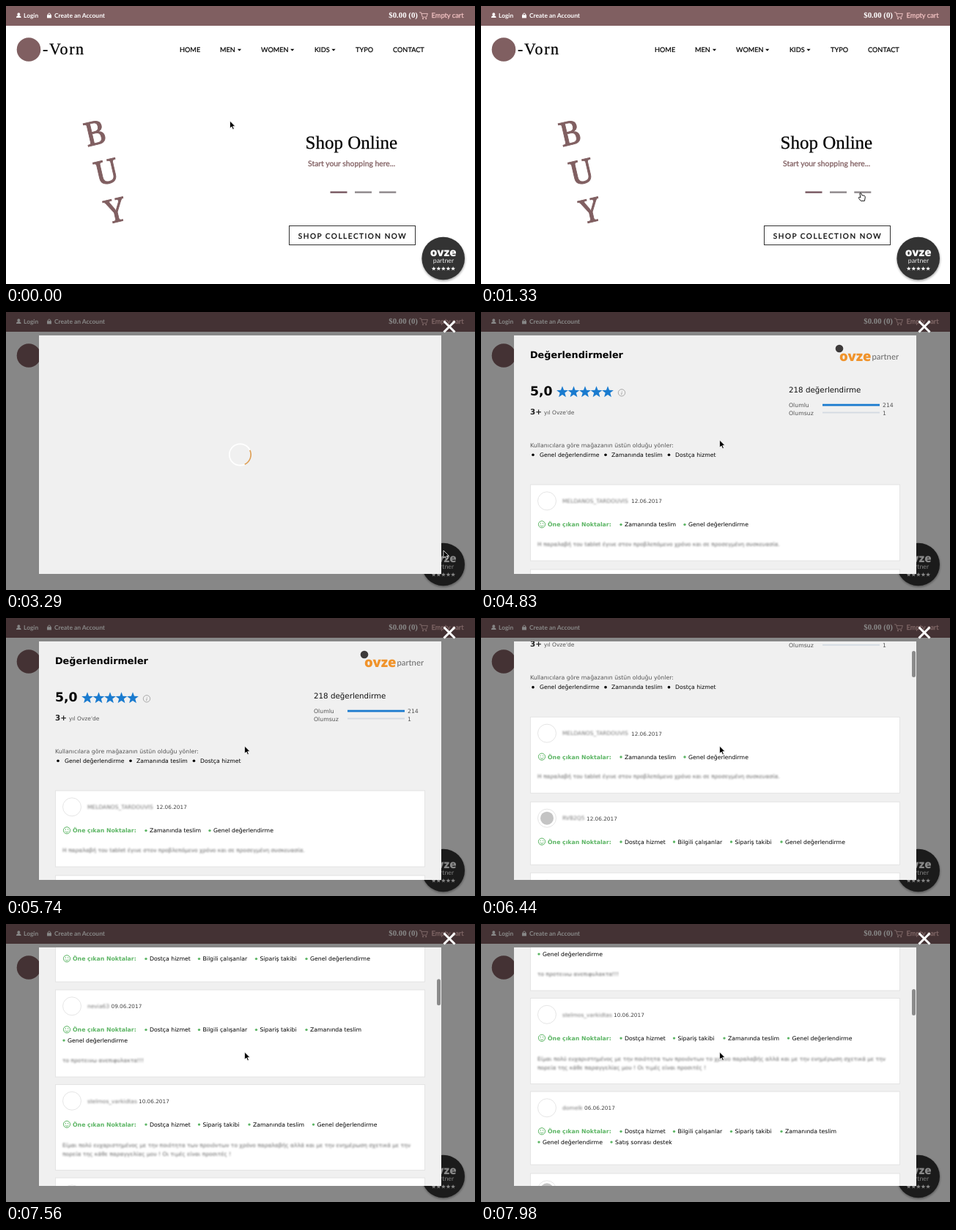
Recreate the animation shown at these times as an HTML page. Size 640x380 px, loop 8000 ms.

```html
<!DOCTYPE html>
<html lang="tr">
<head>
<meta charset="utf-8">
<title>Shop reviews</title>
<style>
  html, body { margin: 0; width: 100%; height: 100%; overflow: hidden; background: #fff; }
  svg { display: block; width: 100vw; height: 100vh; }
  text { text-rendering: geometricPrecision; white-space: pre; }
  .lato { font-family: Lato, sans-serif; }
  .serif { font-family: "Liberation Serif", serif; }
  .slab { font-family: "Noto Serif", serif; }
  .logo { font-family: "Open Sans", sans-serif; font-weight: 800; }
  .ui { font-family: "DejaVu Sans", sans-serif; }
  .b { font-weight: 700; }
  .blur { filter: blur(1.1px); }
</style>
</head>
<body>
<svg id="stage" viewBox="0 0 640 380" xmlns="http://www.w3.org/2000/svg"></svg>
<script>
const LOOP = 8000, STEP = 70;
const BROWN = '#805f61', GREEN = '#5cb564', BLUE = '#1a7bcf';

const text = (x, y, size, str, cls, fill = '#000', extra = '') =>
  `<text x="${x}" y="${y}" font-size="${size}" class="${cls}" fill="${fill}" ${extra}>${str}</text>`;
const rect = (x, y, w, h, fill, extra = '') =>
  `<rect x="${x}" y="${y}" width="${w}" height="${h}" fill="${fill}" ${extra}/>`;
const circle = (x, y, r, fill, extra = '') =>
  `<circle cx="${x}" cy="${y}" r="${r}" fill="${fill}" ${extra}/>`;
const path = (d, fill, extra = '') => `<path d="${d}" fill="${fill}" ${extra}/>`;
// thin outline that thickens text a little
const heavier = (color, width) => `stroke="${color}" stroke-width="${width}" `;

function star(cx, cy, r, fill) {
  const pts = [];
  for (let i = 0; i < 10; i++) {
    const a = i * Math.PI / 5, q = i % 2 ? r * 0.42 : r;
    pts.push((cx + q * Math.sin(a)).toFixed(2) + ',' + (cy - q * Math.cos(a)).toFixed(2));
  }
  return `<polygon points="${pts.join(' ')}" fill="${fill}"/>`;
}
const stars = (x, y, gap, r, fill) =>
  [0, 1, 2, 3, 4].map(i => star(x + i * gap, y, r, fill)).join('');

function topBar() {
  const pink = '#f6c6c6';
  return rect(0, 0, 640, 27, BROWN) +
    circle(17.3, 11.2, 1.9, '#fff') + path('M14 16Q14 13 17.3 13Q20.6 13 20.6 16Z', '#fff') +
    text(24, 16, 8.4, 'Login', 'lato b', '#fff') +
    rect(56, 12.2, 6, 4.2, '#fff') +
    path('M57.3 12.4V11Q59 8.6 60.7 11V12.4', 'none', 'stroke="#fff"') +
    text(66, 16, 8.45, 'Create an Account', 'lato b', '#fff') +
    text(522.3, 15.6, 10.8, '$0.00 (0)', 'serif b', '#fff') +
    path('M564 8.8H566.4L568.4 15.2H573.8L575.4 10.4H567', 'none', 'stroke="#f3c9c9" stroke-width=".9"') +
    circle(569, 17.2, 1, '#f3c9c9') + circle(573.2, 17.2, 1, '#f3c9c9') +
    text(580.5, 16, 9.3, 'Empty cart', 'lato', pink, heavier(pink, 0.25));
}

function nav() {
  const items = [[237, 'HOME'], [292, 'MEN', 318.5], [348, 'WOMEN', 390.7],
    [421, 'KIDS', 447], [477, 'TYPO'], [528, 'CONTACT']];
  return circle(31, 59.5, 16.3, BROWN) +
    text(50, 66, 22, '-Vorn', 'serif', '#000', heavier('#000', 0.25) + 'letter-spacing="1.6"') +
    items.map(([x, label, caret]) => text(x, 63, 9.2, label, 'lato', '#000', heavier('#000', 0.2)) +
      (caret ? path(`M${caret - 2.6} 58.8h5.2l-2.6 2.7z`, '#000') : '')).join('');
}

function hero() {
  const letters = [['B', 121.5, 173], ['U', 137, 226], ['Y', 149, 279]];
  return letters.map(([ch, x, y]) =>
      text(0, 16.5, 45, ch, 'slab', BROWN,
        heavier(BROWN, 0.9) + `text-anchor="middle" transform="translate(${x} ${y}) rotate(-13)"`)).join('') +
    text(408.5, 195, 25, 'Shop Online', 'serif', '#000', heavier('#000', 0.25)) +
    text(412, 219, 10.4, 'Start your shopping here...', 'lato', BROWN, heavier(BROWN, 0.3)) +
    rect(442.5, 253.4, 23, 2.4, '#76565f') +
    rect(476, 253.4, 23, 2.4, '#8d878a') + rect(509.3, 253.4, 23, 2.4, '#8d878a') +
    rect(386.5, 300.5, 172, 26, '#fff', 'stroke="#333"') +
    text(398.8, 317.6, 10, 'SHOP COLLECTION NOW', 'lato', '#000', heavier('#000', 0.25) + 'letter-spacing="1.53"');
}

function badge() {
  return circle(597, 346.5, 29.5, '#000', 'opacity=".35" style="filter:blur(1.5px)"') +
    circle(596.7, 345, 29.3, '#333') +
    text(596.7, 342.3, 15.2, 'ovze', 'logo', '#fff', 'text-anchor="middle"') +
    text(597, 351, 8.8, 'partner', 'lato', '#eee', 'text-anchor="middle"') +
    stars(583.7, 359, 6.6, 3.1, '#fff');
}

function summary() {
  const gray = '#555';
  const merits = [[71, 80, 'Genel değerlendirme'], [170, 178, 'Zamanında teslim'], [256.5, 265, 'Dostça hizmet']];
  return text(67, 63.2, 12.8, 'Değerlendirmeler', 'ui b') +
    circle(489, 50, 5.3, '#3d3a3a') +
    text(489, 66.5, 18.5, 'ovze', 'logo', '#f0932b') +
    text(533.5, 65.3, 11.3, 'partner', 'lato', '#666') +
    text(67, 114, 17.2, '5,0', 'ui b') +
    stars(111, 109.5, 15.5, 8.3, BLUE) +
    circle(192, 110.3, 4.7, 'none', 'stroke="#999" stroke-width=".8"') +
    text(192, 113, 7, 'i', 'serif', '#777', 'text-anchor="middle" font-style="italic"') +
    text(67, 140, 10.4, '3+', 'ui b', '#222') + text(86, 140, 7.5, "yıl Ovze'de", 'ui', gray) +
    text(420, 110, 10.3, '218 değerlendirme', 'ui', '#111') +
    text(420, 130, 7.75, 'Olumlu', 'ui', gray) + rect(466, 125.7, 78, 2.8, BLUE) +
    text(548, 130, 7.75, '214', 'ui', gray) +
    text(420, 140.5, 7.75, 'Olumsuz', 'ui', gray) + rect(466, 136.6, 78, 1.8, '#d3dae2') +
    text(548, 140.5, 7.75, '1', 'ui', gray) +
    text(67, 185, 7.8, 'Kullanıcılara göre mağazanın üstün olduğu yönler:', 'ui', gray) +
    merits.map(([dot, x, s]) => circle(dot, 195.3, 1.8, '#000') + text(x, 198, 7.72, s, 'ui')).join('');
}

const PRAISE = { time: 'Zamanında teslim', all: 'Genel değerlendirme', kind: 'Dostça hizmet',
  staff: 'Bilgili çalışanlar', track: 'Sipariş takibi', after: 'Satış sonrası destek' };

// tags: [x, key, line]; notes: [offset, text]
const REVIEWS = [
  { top: 236, h: 104, name: 'MELDANOS_TARDOUVIS', date: '12.06.2017', dx: 205,
    tags: [[196, 'time'], [283, 'all']],
    notes: [[84, 'Η παραλαβή του tablet έγινε στον προβλεπόμενο χρόνο και σε προσεγμένη συσκευασία.']] },
  { top: 352, h: 86, name: 'RVB2Q5', date: '12.06.2017', dx: 144, face: 1,
    tags: [[196, 'kind'], [268.5, 'staff'], [346.5, 'track'], [415, 'all']], notes: [] },
  { top: 449, h: 119, name: 'nevia63', date: '09.06.2017', dx: 143.5,
    tags: [[196, 'kind'], [268.5, 'staff'], [346.5, 'track'], [415, 'time'], [84, 'all', 1]],
    notes: [[98.5, 'το προτεινω ανεπιφυλακτα!!!']] },
  { top: 578.5, h: 117, name: 'stelmos_varkidtas', date: '10.06.2017', dx: 181,
    tags: [[196, 'kind'], [268.5, 'track'], [337, 'time'], [424.5, 'all']],
    notes: [[85.5, 'Είμαι πολύ ευχαριστημένος με την ποιότητα των προιόντων το χρόνο παραλαβής αλλά και με την ενημέρωση σχετικά με την'],
      [97, 'πορεία της κάθε παραγγελίας μου ! Οι τιμές είναι προσιτές !']] },
  { top: 706, h: 100, name: 'domelk', date: '06.06.2017', dx: 141,
    tags: [[196, 'kind'], [268.5, 'staff'], [346.5, 'track'], [415, 'time'], [84, 'all', 1], [183, 'after', 1]], notes: [] },
  { top: 818, h: 100, name: 'talvo41', date: '06.06.2017', dx: 144, face: 1, tags: [[196, 'kind']], notes: [] }
];

function review(r) {
  const tags = r.tags.map(([x, key, line = 0]) =>
    circle(x - 5, 54.6 + line * 14.5, 1.7, GREEN) + text(x, 57.3 + line * 14.5, 7.75, PRAISE[key], 'ui'));
  const notes = r.notes.map(([y, s]) => text(77, y, 7.5, s, 'ui blur', '#666'));
  return `<g transform="translate(0 ${r.top})">` +
    rect(67.5, 0, 504, r.h, '#fff', 'stroke="#e4e4e4"') +
    circle(90, 22.3, 12.5, '#fff', 'stroke="#e2e2e2" stroke-width=".9"') +
    (r.face ? circle(90, 22.3, 9, '#c4c4c4') : '') +
    text(111, 25, 7.5, r.name, 'ui blur', '#777') +
    text(r.dx, 25.2, 7.3, r.date, 'ui', '#444') +
    circle(83, 54.3, 4.6, 'none', `stroke="${GREEN}"`) +
    circle(81.4, 53, 0.7, GREEN) + circle(84.6, 53, 0.7, GREEN) +
    path('M80.5 55.3Q83 58.5 85.5 55.3', 'none', `stroke="${GREEN}" stroke-width=".9"`) +
    text(91, 57.3, 7.78, 'Öne çıkan Noktalar:', 'ui b', GREEN) +
    tags.join('') + notes.join('') + '</g>';
}

const stage = document.getElementById('stage');
stage.innerHTML =
  `<clipPath id="frame">${rect(45, 32, 549, 326, '#fff')}</clipPath>` +
  rect(0, 0, 640, 380, '#fff') + topBar() + nav() + hero() + badge() +
  `<g id="modal">${rect(0, 0, 640, 380, '#000', 'opacity=".47"')}` +
    rect(45, 32, 549, 326, '#f0f0f0') +
    `<g id="spinner">${circle(319.5, 195, 14.7, 'none', 'stroke="#fff" stroke-width="1.7"')}` +
      `<path id="arc" d="M319.5 180.3A14.7 14.7 0 0 1 334.2 195" fill="none" stroke="#dc9f57" stroke-width="1.7"/></g>` +
    `<g id="content" clip-path="url(#frame)"><g id="list">${summary()}${REVIEWS.map(review).join('')}</g>` +
      rect(588, 0, 5, 36, '#8b8b8b', 'id="thumb" rx="2.5"') + '</g>' +
    path('M597.5 12.5L612.5 27.5M612.5 12.5L597.5 27.5', 'none', 'stroke="#fff" stroke-width="3"') + '</g>' +
  '<g id="cursor">' +
    path('M0 0V10.3L2.4 8.1L4.1 11.9L5.8 11.1L4.2 7.4H7.4Z', '#000', 'id="arrow" stroke="#fff" stroke-width=".8"') +
    path('M-1.6 1Q-.8 -.2 .2 .9L1.2 3.6L4.8 4.3Q6 5 5.7 7.2L4.9 11.4H-.2L-3.2 7.6Q-3.4 6 -1.6 6.4L-.6 7Z', '#fff',
      'id="hand" stroke="#000" stroke-width=".9"') + '</g>';

const part = id => document.getElementById(id);
const [modal, spinner, arc, content, list, thumb, cursor, arrow, hand] =
  ['modal', 'spinner', 'arc', 'content', 'list', 'thumb', 'cursor', 'arrow', 'hand'].map(part);

const show = (el, on) => el.setAttribute('visibility', on ? 'inherit' : 'hidden');
const move = (el, x, y) => el.setAttribute('transform', `translate(${x.toFixed(2)} ${y.toFixed(2)})`);

function ease(t, from, to) {
  const p = Math.min(1, Math.max(0, (t - from) / (to - from)));
  return p * p * (3 - 2 * p);
}

// [start, end, x, y]
const MOVES = [[710, 1330, 518.5, 255], [1560, 2400, 597, 326], [3620, 4550, 325.6, 175]];

function draw(ms) {
  const t = Math.floor(ms / STEP) * STEP;

  let x = 305.5, y = 157;
  for (const [from, to, tx, ty] of MOVES) {
    const p = ease(t, from, to);
    x += (tx - x) * p;
    y += (ty - y) * p;
  }
  move(cursor, x, y);
  const onDash = t >= 1260 && t < 1680, onBadge = t >= 2170 && t < 2800;
  show(hand, onDash || onBadge);
  show(arrow, !(onDash || onBadge));

  modal.setAttribute('opacity', ease(t, 2730, 3080).toFixed(3));
  const loaded = t >= 3990;
  show(spinner, !loaded);
  show(content, loaded);
  arc.setAttribute('transform', `rotate(${65 + (t - 3290) * 0.36} 319.5 195)`);

  const scroll = 241 * ease(t, 5935, 7070) + 236 * ease(t, 7140, 7980);
  move(list, 0, -scroll);
  move(thumb, 0, 33.2 + scroll * 0.117);
  show(thumb, loaded && scroll > 0);
}

const start = performance.now();
function tick() {
  draw((performance.now() - start) % LOOP);
  requestAnimationFrame(tick);
}
tick();
</script>
</body>
</html>
```
